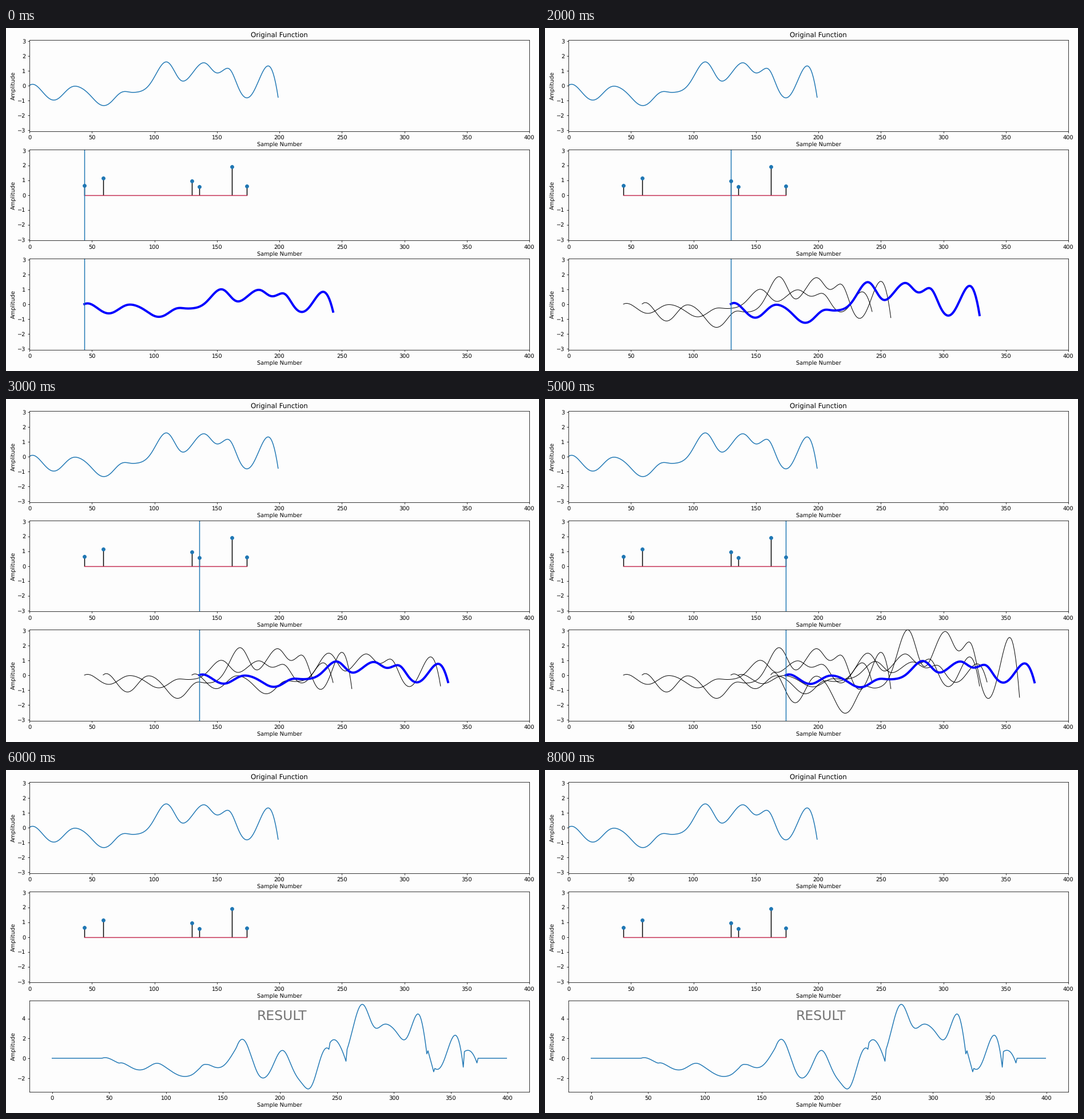
A matplotlib script for the animation above (9000 ms loop, 932 by 601 pixels).

```python
import matplotlib.pyplot as plt
import numpy as np
from matplotlib.animation import FuncAnimation

W, H, DPI = 932, 601, 64
PAPER = "#fdfdfd"
S = 1.1  # size factor for fonts and strokes

plt.rcParams.update({
    "font.family": "DejaVu Sans",
    "font.size": 10 * S,
    "axes.titlesize": 12 * S,
    "axes.titlepad": 6 * S,
    "axes.labelpad": 2.5,
    "axes.linewidth": 0.8 * S,
    "axes.facecolor": PAPER,
    "figure.facecolor": PAPER,
    "lines.linewidth": 1.5 * S,
    "lines.markersize": 6 * S,
    "text.hinting": "none",
})
for axis in ("xtick", "ytick"):
    plt.rcParams[axis + ".major.size"] = 3.5 * S
    plt.rcParams[axis + ".major.pad"] = 3.5 * S
    plt.rcParams[axis + ".major.width"] = 0.8 * S

# Peaks and dips of the signal (sample, value), and points it passes through
TURNS = [(2.5, 0.10), (19.5, -0.97), (36.5, -0.03), (59.5, -1.34),
         (76.5, -0.39), (83, -0.45), (109.5, 1.61), (123, 0.31),
         (139.5, 1.55), (150.5, 0.86), (158.5, 1.18), (174, -0.82),
         (191, 1.34)]
PASSES = [(0, 0.02), (49, -0.68), (63, -1.25), (98, 0.31),
          (166, 0.12), (199, -0.78)]

IMPULSES = [(44, 0.63), (59, 1.16), (130, 0.93),
            (136, 0.58), (162, 1.91), (174, 0.60)]


def smooth_signal(n=200, weight=2):
    """Least-jerk curve on a half-sample grid, flat at the turning points."""
    m = 2 * n - 1
    eye = np.eye(m)
    rows, vals = [np.diff(eye, 3, axis=0)], [np.zeros(m - 3)]
    for x, y in TURNS + PASSES:
        rows.append(weight * eye[[int(2 * x)]])
        vals.append([weight * y])
    for x, _ in TURNS:
        k = int(2 * x)
        rows.append(eye[[k + 1]] - eye[[k - 1]])
        vals.append([0])
    fit = np.linalg.lstsq(np.vstack(rows), np.concatenate(vals), rcond=None)[0]
    return fit[::2]


signal = smooth_signal()
samples = np.arange(len(signal))
result = np.zeros(400)
for pos, amp in IMPULSES:
    result[pos:pos + len(signal)] += amp * signal

fig = plt.figure(figsize=(W / DPI, H / DPI), dpi=DPI)


def panel(row, xlim=(0, 400), ylim=(-3.07, 3.07), yticks=range(-3, 4)):
    left, width, height = 41, 874, 159.5
    bottom = H - (21.4 + 191.5 * row + height)
    ax = fig.add_axes([left / W, bottom / H, width / W, height / H])
    ax.set(xlim=xlim, ylim=ylim, yticks=yticks,
           xlabel="Sample Number", ylabel="Amplitude")
    return ax


ax_func = panel(0)
ax_func.set_title("Original Function")
ax_func.plot(samples, signal)

ax_imp = panel(1)
xs, ys = zip(*IMPULSES)
ax_imp.vlines(xs, 0, ys, color="k", lw=1.5 * S, zorder=1)
ax_imp.plot([xs[0], xs[-1]], [0, 0], color="#c42c50")
ax_imp.plot(xs, ys, "o", color="C0", zorder=3)

ax_sum = panel(2)
copies = [ax_sum.plot(samples + pos, amp * signal)[0] for pos, amp in IMPULSES]
cursors = [ax.axvline(0, color="C0") for ax in (ax_imp, ax_sum)]

ax_res = panel(2, (-19.95, 418.95), (-3.38, 5.79), range(-2, 5, 2))
ax_res.plot(result)
ax_res.text(180, 3.89, "RESULT", fontsize=24 * S, color="0.46")


def update(step):
    adding = step < len(IMPULSES)
    ax_sum.set_visible(adding)
    ax_res.set_visible(not adding)
    for i, line in enumerate(copies):
        current = i == step
        line.set_visible(i <= step)
        line.set_color("b" if current else "k")
        line.set_linewidth((4 if current else 1) * S)
    for cursor in cursors:
        cursor.set_visible(adding)
        if adding:
            cursor.set_xdata([xs[step]] * 2)
    return []


anim = FuncAnimation(fig, update, frames=9, interval=1000,
                     repeat=True, repeat_delay=0, blit=False)
plt.show()
```
